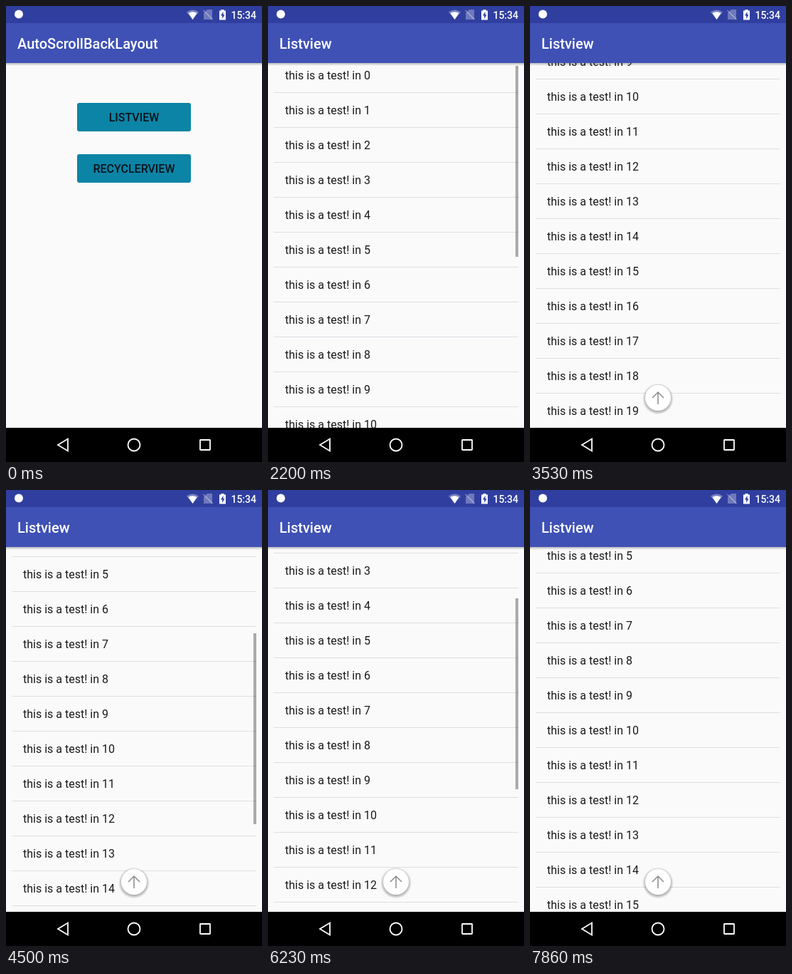
An HTML page that plays this animation: 360x640 px, repeating every 8000 ms.

```html
<!DOCTYPE html>
<html lang="en">
<head>
<meta charset="utf-8">
<title>Scroll back list</title>
<style>
  html, body { margin: 0; width: 100%; height: 100%; overflow: hidden; background: #000; }
  svg { display: block; width: 100vw; height: 100vh; font-family: Roboto, sans-serif; }
  .title { font-size: 20px; font-weight: 500; fill: #fff; }
  .label { font-size: 16px; font-weight: 500; fill: #06121a; text-anchor: middle; }
  .item { font-size: 16px; fill: #1a1a1a; }
  .clock { font-size: 14px; font-weight: 500; fill: #fff; text-anchor: end; }
</style>
</head>
<body>
<svg viewBox="0 0 360 640">
  <defs>
    <clipPath id="listClip"><rect y="80" width="360" height="512"/></clipPath>
    <clipPath id="buttonClip"><rect x="100" y="136" width="160" height="40" rx="3"/></clipPath>
    <linearGradient id="shade" x2="0" y2="1">
      <stop offset="0" stop-opacity=".26"/>
      <stop offset="1" stop-opacity="0"/>
    </linearGradient>
    <radialGradient id="fabShade">
      <stop offset=".78" stop-opacity=".3"/>
      <stop offset="1" stop-opacity="0"/>
    </radialGradient>
    <g id="page">
      <rect width="360" height="640" fill="#fafafa"/>
      <rect width="360" height="24" fill="#303f9f"/>
      <rect y="24" width="360" height="56" fill="#3f51b5"/>
      <rect y="592" width="360" height="48"/>
    </g>
    <rect id="barShade" y="80" width="360" height="4" fill="url(#shade)"/>
  </defs>

  <g id="home">
    <use href="#page"/>
    <use href="#barShade"/>
    <text class="title" x="16" y="59.5">AutoScrollBackLayout</text>
    <g fill="#0c84a6">
      <rect x="100" y="136" width="160" height="40" rx="3"/>
      <rect x="100" y="208" width="160" height="40" rx="3"/>
    </g>
    <g clip-path="url(#buttonClip)"><circle id="ripple" cx="180" cy="156" r="0" opacity=".14"/></g>
    <text class="label" x="180" y="162">LISTVIEW</text>
    <text class="label" x="180" y="234">RECYCLERVIEW</text>
  </g>

  <g id="screen">
    <use href="#page"/>
    <g clip-path="url(#listClip)">
      <g id="rows"></g>
      <rect id="thumb" x="348" y="80" width="4" height="268" opacity=".32"/>
      <g id="fab">
        <circle cy="1.5" r="22" fill="url(#fabShade)"/>
        <circle r="18" fill="#fff"/>
        <path d="M0 9V-8M-8 0L0 -8L8 0" fill="none" stroke="#8c8c8c" stroke-width="1.5"/>
      </g>
    </g>
    <use href="#barShade"/>
    <text class="title" x="16" y="59.5">Listview</text>
  </g>

  <g fill="#fff">
    <circle cx="18" cy="11.5" r="6"/>
    <path d="M254 8.5Q262.5 2.5 271 8.5L262.5 19Z" opacity=".35"/>
    <path d="M256.5 10Q262.5 6.5 268.5 10L262.5 19Z"/>
    <path d="M283 5H290V19H278V10Z" opacity=".3"/>
    <path d="M277.5 6L290.5 19" stroke="#fff" stroke-width="1.3" opacity=".4"/>
    <path d="M302.5 5H306.5V6.5H309V19.5H300V6.5H302.5Z"/>
    <path d="M305.5 8L302 13.5H304.2V18L307.5 12.3H305.5Z" fill="#303f9f"/>
    <text class="clock" x="352" y="17.5">15:34</text>
  </g>
  <g fill="none" stroke="#fff" stroke-width="1.8">
    <path d="M73 616L87 607.5V624.5Z"/>
    <circle cx="180" cy="616" r="8.5"/>
    <rect x="273" y="609" width="14" height="14" rx=".5"/>
  </g>
</svg>
<script>
const LOOP = 8000, ROW = 49, COUNT = 20, VIEW = 512;
const OPEN = 794;
const $ = id => document.getElementById(id);
const clamp = v => Math.min(1, Math.max(0, v));
const part = (t, from, to) => clamp((t - from) / (to - from));
const easeOut = (u, power) => 1 - Math.pow(1 - u, power);
const sine = u => (1 - Math.cos(Math.PI * u)) / 2;
const quad = u => easeOut(u, 2);

// start, end, from, to, easing
const scrolls = [
  [2200, 2990, 7, 467, sine],
  [4340, 4660, 467, 0, sine],
  [5730, 6230, 0, 138, sine],
  [6590, 7240, 138, 257, quad]
];

function scrollAt(t) {
  let pos = 0;
  for (const [start, end, from, to, ease] of scrolls)
    if (t >= start) pos = from + (to - from) * ease(part(t, start, end));
  return Math.round(pos);
}

function thumbAlpha(t) {
  if (t < 4340) return 1 - part(t, 3290, 3530);
  if (t < 5730) return 1 - part(t, 4950, 5190);
  return 1 - part(t, 7530, 7850);
}

function fabScale(t) {
  if (t < 4640) return quad(part(t, 2380, 2600));
  if (t < 5730) return 1 - quad(part(t, 4640, 4860));
  return quad(part(t, 5930, 6150));
}

function row(i) {
  const y = 80 + i * ROW;
  const line = `<rect x="8" y="${y + 48}" width="344" height="1" fill="#dfdde4"/>`;
  return `<text class="item" x="24" y="${y + 30}">this is a test! in ${i}</text>` +
    (i < COUNT - 1 ? line : "");
}

function draw(t) {
  const since = t - OPEN;
  $("ripple").setAttribute("r", 84 * quad(part(t, 500, OPEN)));
  $("home").setAttribute("opacity", 1 - 0.3 * clamp(since / 217));

  const shift = 51.2 * (1 - easeOut(clamp(since / 350), 5));
  $("screen").setAttribute("opacity", easeOut(clamp(since / 200), 4));
  $("screen").setAttribute("transform", `translate(0 ${Math.round(shift)})`);

  const pos = scrollAt(t);
  $("rows").setAttribute("transform", `translate(0 ${-pos})`);
  $("thumb").setAttribute("y", 80 + Math.round(pos * VIEW / (ROW * COUNT)));
  $("thumb").setAttribute("opacity", 0.32 * thumbAlpha(t));

  const scale = fabScale(t);
  $("fab").setAttribute("transform", `translate(180 550) scale(${scale})`);
  $("fab").setAttribute("opacity", scale);
}

$("rows").innerHTML = Array.from({ length: COUNT }, (_, i) => row(i)).join("");
const began = performance.now();
function tick() {
  draw((performance.now() - began) % LOOP);
  requestAnimationFrame(tick);
}
draw(0);
requestAnimationFrame(tick);
</script>
</body>
</html>
```
